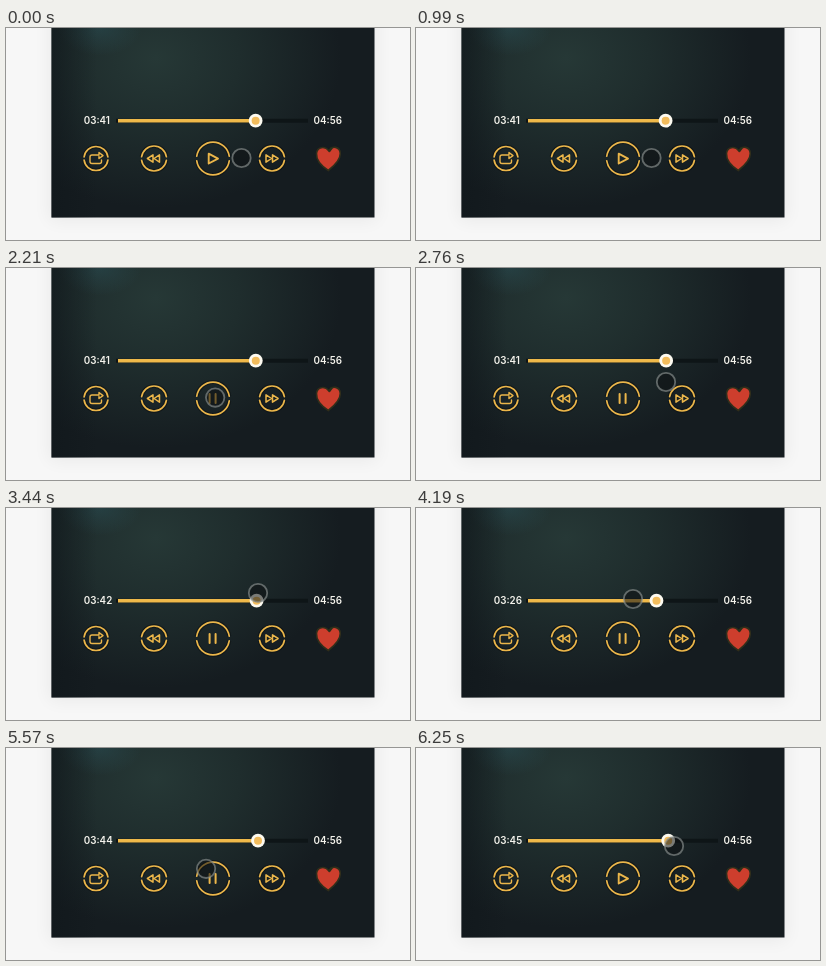
Recreate the animation shown at these times as an HTML page. Size 404 by 212 pixels, loop 6320 ms.

```html
<!DOCTYPE html>
<html lang="en">
<head>
<meta charset="utf-8">
<title>Music player</title>
<style>
  html, body { margin: 0; width: 100%; height: 100%; overflow: hidden; background: #f7f7f7; }
  svg { display: block; width: 404px; height: 212px; }
  text { font: 600 9.8px Inter, "Liberation Sans", sans-serif; fill: #f4f3ec; }
  .gold { fill: none; stroke: #ebb64a; stroke-width: 1.7; stroke-linejoin: round; stroke-linecap: round; }
  .halo { fill: none; stroke: #0c1113; stroke-width: 4; opacity: .6; }
</style>
</head>
<body>
<svg viewBox="0 0 404 212">
  <defs>
    <radialGradient id="glow" gradientUnits="userSpaceOnUse" r="1" cx="0" cy="0"
      gradientTransform="translate(150 30) scale(185 150)">
      <stop offset="0" stop-color="#263836"/>
      <stop offset=".45" stop-color="#1f2d2d"/>
      <stop offset="1" stop-color="#151c20"/>
    </radialGradient>
    <radialGradient id="teal">
      <stop offset="0" stop-color="#2c535a"/>
      <stop offset="1" stop-color="#2c535a" stop-opacity="0"/>
    </radialGradient>
    <linearGradient id="edge">
      <stop offset="0" stop-color="#10171b" stop-opacity=".6"/>
      <stop offset=".14" stop-color="#10171b" stop-opacity="0"/>
    </linearGradient>
    <filter id="soft" x="-20%" y="-20%" width="140%" height="140%">
      <feGaussianBlur stdDeviation="9"/>
    </filter>
  </defs>

  <path d="M44-30H370V192H44Z" opacity=".06" filter="url(#soft)"/>
  <path d="M45.5-2H368.5V189.5H45.5Z" fill="url(#glow)"/>
  <ellipse cx="94" cy="0" rx="42" ry="28" fill="url(#teal)" opacity=".45"/>
  <path d="M45.5-2H368.5V189.5H45.5Z" fill="url(#edge)"/>

  <text id="elapsed" x="77.8" y="96.2"></text>
  <text x="307.6" y="96.2">04:56</text>
  <path d="M110 92.7H302" stroke="#0e1517" stroke-width="4"/>
  <path id="played" stroke="#efb94a" stroke-width="3.5"/>
  <g id="knob">
    <circle r="6.9" fill="#fdfaf0"/>
    <circle r="4" fill="#f2bc5c"/>
  </g>

  <path id="halos" class="halo"/>
  <path id="rings" class="gold"/>
  <g class="gold">
    <path d="M95.5 132V133.5Q95.5 135.5 93.5 135.5H86Q84 135.5 84 133.5V129Q84 127 86 127H93V124.5L97 127.6L93 130.5V128.5"
      stroke-width="1.4"/>
    <path id="rewind" d="M147 126.8V134.2L141.4 130.5ZM153.5 126.8V134.2L148 130.5Z" stroke-width="1.5"/>
    <use href="#rewind" transform="matrix(-1 0 0 1 413.5 0)"/>
    <path id="play" d="M202.7 125.7L212 130.6L202.7 135.5Z" stroke-width="1.9"/>
    <path id="pause" d="M203.6 126V135M209.6 126V135" stroke-width="2"/>
  </g>
  <path d="M322.3 142.5C317 139 310 133 310.5 125.5C311 118.8 319 117.5 323 123C326 117 334 118.5 334.3 125.5C334.4 132 328 138 322.3 142.5Z"
    fill="#cd3e2d" stroke="#302e1b" stroke-width="1.6"/>
  <path d="M323 123.5L326 119.5" stroke="#283018" stroke-width="2.2"/>

  <circle id="cursor" r="9.2" fill="rgba(14,18,20,.55)" stroke="rgba(140,146,145,.65)" stroke-width="1.8"/>
</svg>

<script>
const LOOP = 6320, PLAY_AT = 2150, PAUSE_AT = 5880;
const START = 221, TOTAL = 296;
const $ = id => document.getElementById(id);
const set = (id, attrs) => { for (const k in attrs) $(id).setAttribute(k, attrs[k]); };
const clamp = v => Math.min(1, Math.max(0, v));
const ease = p => p * p * (3 - 2 * p);

// The pointer eases from stop to stop: arrival time, x, y.
const stops = [
  [990, 235.5, 130], [1460, 236, 84], [2150, 208, 130], [2760, 250, 114],
  [3440, 252, 85], [4190, 217, 91], [4940, 176, 89], [5850, 207, 130], [6250, 258, 98]
];

function pointer(t) {
  let [time, x, y] = stops[0];
  for (const [end, toX, toY] of stops.slice(1)) {
    const p = ease(clamp((t - time) / (end - time)));
    x += (toX - x) * p;
    y += (toY - y) * p;
    time = end;
  }
  return { cx: x, cy: y };
}

// Circular outline, open on both sides.
function ring(x, r) {
  const gap = 0.14, dx = r * Math.cos(gap), dy = r * Math.sin(gap);
  const half = s => `M${x + s * dx} ${130.5 + s * dy}A${r} ${r} 0 0 1 ${x - s * dx} ${130.5 + s * dy}`;
  return half(1) + half(-1);
}
const outline = ring(90, 12) + ring(148, 12.5) + ring(207, 16.4) + ring(266, 12.5);
set("halos", { d: outline });
set("rings", { d: outline });

function draw(t) {
  const playing = t >= PLAY_AT && t < PAUSE_AT;
  const played = t < PLAY_AT ? 0 : 0.2 + (Math.min(t, PAUSE_AT) - PLAY_AT) / 950;
  const scrub = -17 * Math.sin(Math.PI * clamp((t - 3800) / 800)) ** 2;
  const seconds = START + played + scrub;
  const s = Math.floor(seconds);
  $("elapsed").textContent = `0${Math.floor(s / 60)}:${String(s % 60).padStart(2, "0")}`;

  const x = 111.5 + 185 * seconds / TOTAL;
  set("played", { d: `M112 92.7H${x}` });
  set("knob", { transform: `translate(${x} 92.7)` });
  set("play", { visibility: playing ? "hidden" : "visible" });
  set("pause", { visibility: playing ? "visible" : "hidden" });
  set("cursor", pointer(t));
}

function frame() {
  draw(performance.now() % LOOP);
  requestAnimationFrame(frame);
}
frame();
</script>
</body>
</html>
```
